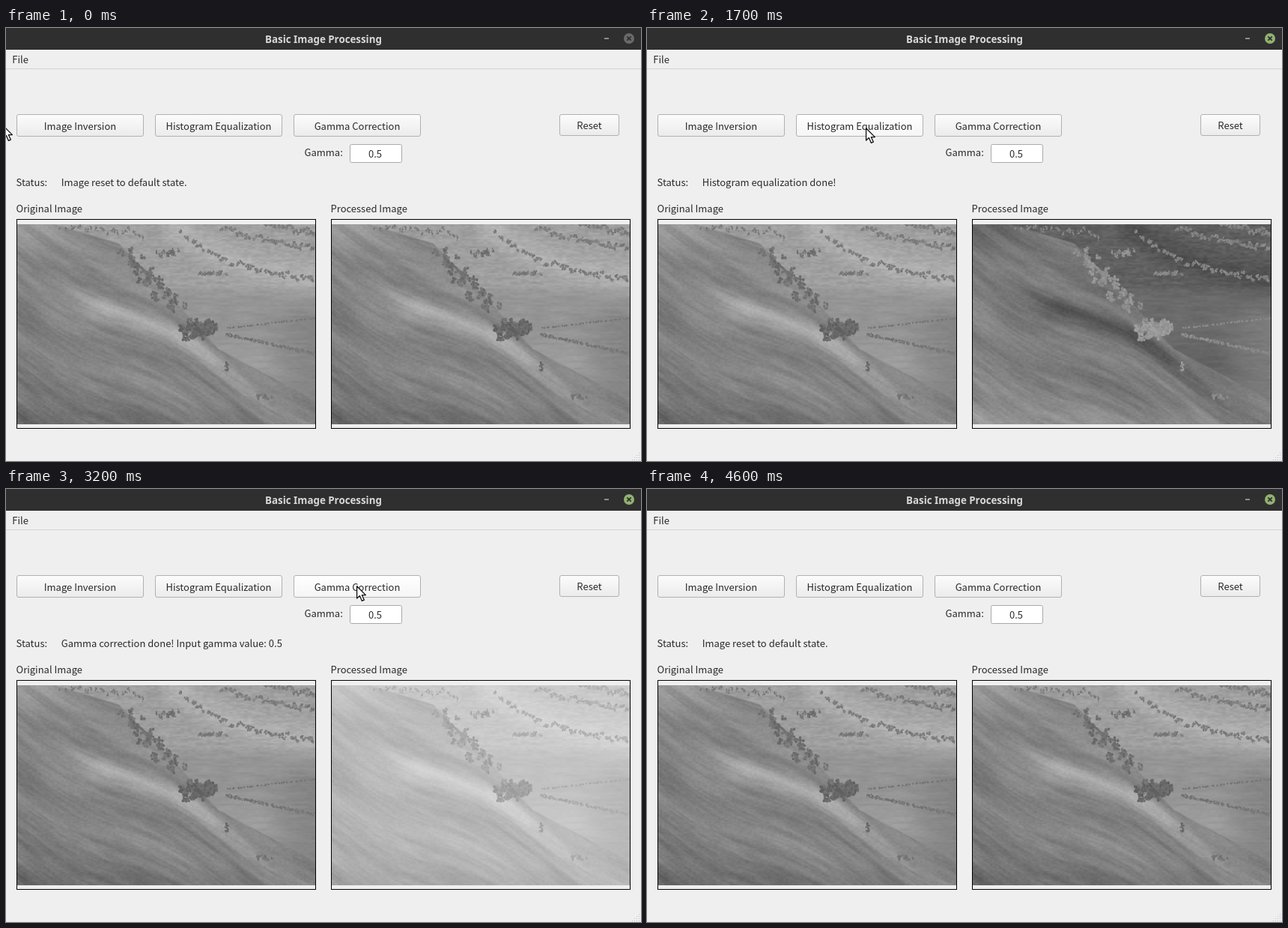
An HTML page with a canvas for the animation above (5400 ms loop, 848x578 px).

```html
<!DOCTYPE html>
<html lang="en">
<head>
<meta charset="utf-8">
<title>Basic Image Processing</title>
<style>
html, body { margin: 0; width: 848px; height: 578px; overflow: hidden; background: #efefef; }
svg, canvas { position: absolute; left: 0; top: 0; }
canvas { top: 262px; }
#before { left: 15px; }
#after { left: 435px; }
text { font: 13px "Noto Sans CJK JP", "Noto Sans CJK SC", "Noto Sans CJK", "Noto Sans", sans-serif; fill: #2a2a2a; white-space: pre; }
.title { font: bold 13.333px "Noto Sans", sans-serif; fill: #d8d8d8; }
.mid { text-anchor: middle; }
.button { fill: url(#face); stroke: #b1b1b1; }
.button.hover { fill: url(#lit); }
.frame { fill: none; stroke: #000; }
</style>
</head>
<body>
<svg width="848" height="578">
  <defs>
    <linearGradient id="face" x2="0" y2="1"><stop stop-color="#fcfcfc"/><stop offset="1" stop-color="#ebebeb"/></linearGradient>
    <linearGradient id="lit" x2="0" y2="1"><stop stop-color="#fff"/><stop offset="1" stop-color="#f5f5f5"/></linearGradient>
  </defs>
  <rect width="848" height="578" fill="#efefef"/>
  <rect width="848" height="29" fill="#2f2f2f"/>
  <text class="title mid" x="424" y="20">Basic Image Processing</text>
  <path d="M799 14h6" stroke="#8d8d8d" stroke-width="2"/>
  <circle id="close" cx="832" cy="14" r="7"/>
  <path d="M829.3 11.3l5.4 5.4m0-5.4l-5.4 5.4" stroke="#2f2f2f" stroke-width="1.8"/>
  <text x="8.3" y="47">File</text>
  <path d="M0 54.5h848" stroke="#d4d4d4"/>
  <g id="buttons"></g>
  <text x="398.5" y="171">Gamma:</text>
  <rect x="459.5" y="155.5" width="69" height="24" rx="2" fill="#fff" stroke="#a9a9a9"/>
  <text class="mid" x="493" y="173">0.5</text>
  <text x="13.5" y="211">Status:</text>
  <text id="status" x="73.7" y="211"></text>
  <text x="13.5" y="246">Original Image</text>
  <text x="433.5" y="246">Processed Image</text>
  <rect class="frame" x="14.5" y="255.5" width="399" height="279"/>
  <rect class="frame" x="434.5" y="255.5" width="399" height="279"/>
  <g id="grip" fill="#bdbdbd"></g>
</svg>
<canvas id="before" width="398" height="267"></canvas>
<canvas id="after" width="398" height="267"></canvas>
<svg width="848" height="578">
  <path id="arrow" d="M.6 .8V17l3.8-3.4 3 6.8 2.9-1.3-3-6.5h5.1z" fill="#fff" stroke="#111" stroke-width="1.3" stroke-linejoin="round"/>
</svg>
<script>
const LOOP = 5400, STEP = 100;
const W = 398, H = 267;
const $ = id => document.getElementById(id);
const svgEl = (tag, attrs, parent) => {
  const el = document.createElementNS("http://www.w3.org/2000/svg", tag);
  for (const k in attrs) el.setAttribute(k, attrs[k]);
  return parent.appendChild(el);
};

// Buttons
const addButton = (label, x, w = 170, h = 30) => {
  const el = svgEl("rect", { class: "button", x: x + .5, y: 115.5, width: w - 1, height: h - 1, rx: 2.5 }, $("buttons"));
  svgEl("text", { class: "mid", x: x + w / 2, y: 106 + h }, $("buttons")).textContent = label;
  return { el, x, w, h };
};
const buttons = ["Image Inversion", "Histogram Equalization", "Gamma Correction"].map((label, i) => addButton(label, 14 + 185 * i));
buttons.push(addButton("Reset", 739, 80, 29));

for (let row = 0; row < 4; row++)
  for (let col = 0; col <= row; col++)
    svgEl("rect", { x: 845 - col * 3, y: 567 + row * 3, width: 1, height: 1 }, $("grip"));

// Noise and curves
const mix = (a, b, p) => a + (b - a) * p;
const smooth = p => p * p * (3 - 2 * p);
const ramp = (a, b, v) => smooth(Math.min(1, Math.max(0, (v - a) / (b - a))));
const bump = (v, width) => Math.exp(-((v / width) ** 2));
const hash = (i, j) => {
  const s = Math.sin(i * 127.1 + j * 311.7) * 43758.5453;
  return s - Math.floor(s);
};
// Smooth value noise from -1 to 1
const noise = (x, y) => {
  const i = Math.floor(x), j = Math.floor(y), p = smooth(x - i), q = smooth(y - j);
  return 2 * mix(mix(hash(i, j), hash(i + 1, j), p), mix(hash(i, j + 1), hash(i + 1, j + 1), p), q) - 1;
};

const ridge = x => 38 + .55 * x + 10 * Math.sin(x / 45);
const belt = (x, k = 0) => 9 + 75 / (k + 1) * (1 - Math.exp((215 + 60 * k - x) / 90)) - 5 * k;
const rim = [[50, 0], [135, 25], [206, 98], [268, 166], [W, 235]];
const edge = x => {
  const i = Math.max(1, rim.findIndex(p => p[0] >= x));
  const [x0, y0] = rim[i - 1], [x1, y1] = rim[i];
  return mix(y0, y1, (x - x0) / (x1 - x0));
};

// Landscape tones
function hill(x, y) {
  const u = y - ridge(x);
  const crest = 24 * bump(u - 3, 13) * ramp(20, 110, x) * ramp(330, 240, x);
  const folds = 6 * Math.sin(u / 13 + 2 * noise(x / 70, u / 40));
  const streaks = 9 * noise(x / 55, u / 8) + 6 * noise(x / 20, u / 3);
  const grass = 5 * noise(x / 3, y / 2);
  return 137 - .09 * Math.max(0, u) + 8 * ramp(100, 20, x + y) - 10 * ramp(225, 265, y) + crest + folds + streaks + grass;
}
function plain(x, y) {
  const far = ramp(100, 75, y);
  const water = 16 * bump(y - belt(x) + 3, 22) * ramp(180, 205, x);
  const foot = 10 * bump(x - 315, 45) * bump(y - 185, 28);
  const shade = 16 * ramp(300, W, x) * ramp(95, 130, y);
  return 149 + 10 * far + water + foot - shade + 5 * noise(x / 25, y / 3) + (3 + 5 * far) * noise(x / 5, y / 2);
}

const g = $("before").getContext("2d", { willReadFrequently: true });
const land = g.createImageData(W, H);
for (let y = 0; y < H; y++)
  for (let x = 0; x < W; x++) {
    const rise = ramp(-1.5, 1.5, y - edge(x));
    const v = mix(plain(x, y), hill(x, y), rise);
    land.data.set([v, v, v, 255], (y * W + x) * 4);
  }
g.putImageData(land, 0, 0);

// Trees
let seed = 11;
const rnd = (a = 0, b = 1) => {
  seed = (seed * 16807) % 2147483647;
  return mix(a, b, seed / 2147483647);
};
const scatter = () => rnd(-1, 1) + rnd(-1, 1);
// Each tree is a crown of small leaves; place(p) gives its middle
function plant(count, place, size, tone, tall = 1) {
  for (let i = 0; i < count; i++) {
    const [x, y] = place((i + rnd()) / count);
    for (let leaf = 0; leaf < 7; leaf++) {
      const v = Math.round(tone + rnd(-13, 13));
      g.fillStyle = `rgb(${v},${v},${v})`;
      g.beginPath();
      g.ellipse(x + scatter() * size * .5, y + scatter() * size * tall * .5, size * .4, size * .45, 0, 0, 7);
      g.fill();
    }
  }
}
const grove = (x, y, w, h) => () => [x + scatter() * w / 2, y + scatter() * h / 2];

for (let k = 0; k < 3; k++)
  plant(42 - 8 * k, p => {
    const x = mix(218 + 55 * k, W, p);
    return [x, belt(x, k) + scatter() * 2.5];
  }, 2.8, 126);
plant(24, p => [mix(55, 170, p), 3 + 10 * p + scatter() * 3], 2, 120, 1.8);
plant(12, grove(262, 66, 22, 3), 2.6, 122);
plant(14, grove(204, 38, 21, 5), 2.2, 110, 2.2);
plant(50, p => {
  const x = mix(145, 216, p);
  return [x + scatter() * 8, edge(x) + 4 + scatter() * 8];
}, 4, 112, 1.3);
plant(60, grove(245, 140, 30, 13), 4.5, 104, 1.2);

// Two hedgerows fan out from the wood
for (const side of [-1, 1])
  plant(34, p => [mix(278, W, p), 143 + 4 * side + 120 * p * (.05 + .165 * side)], 2 + .5 * side, 118);
plant(4, p => [280, 185 + 11 * p], 2.6, 108);
plant(16, grove(330, 230, 14, 4), 1.8, 117);

// Processed versions
const tones = {
  plain: v => v,
  invert: v => 255 - v,
  equalize: v => (v - 98) * 3.6,
  gamma: v => 255 * Math.sqrt(v / 255)
};
const source = g.getImageData(0, 0, W, H);
const pictures = {};
for (const name in tones)
  pictures[name] = new ImageData(source.data.map((v, i) => i % 4 < 3 ? Math.min(255, Math.max(0, tones[name](v))) : v), W, H);

// Each action: glide to a point, click, then show the result
const reset = { x: -4, y: 130, from: 0, to: 0, click: 0, text: "Image reset to default state.", view: "plain" };
const actions = [
  reset,
  { x: 121, y: 132, from: 0, to: 500, click: 600, text: "Image inversion done!", view: "invert" },
  { x: 292, y: 133, from: 1000, to: 1600, click: 1700, lag: 200, text: "Histogram equalization done!", view: "equalize" },
  { x: 427, y: 128, from: 2100, to: 2400, click: 3200, text: "Gamma correction done! Input gamma value: 0.5", view: "gamma" },
  { ...reset, x: 758, y: 133, from: 3100, to: 4100, click: 4200 }
];

function pointerAt(t) {
  let { x, y } = reset;
  for (const a of actions.slice(1)) {
    const p = Math.min(1, Math.max(0, (t - a.from) / (a.to - a.from)));
    const e = 1 - (1 - p) ** 1.25;
    x = mix(x, a.x, e);
    y = mix(y, a.y, e);
  }
  return [Math.round(x), Math.round(y)];
}

const after = $("after").getContext("2d");
let shown;
function render(now) {
  const t = Math.floor((now % LOOP) / STEP) * STEP;
  const [x, y] = pointerAt(t);
  $("arrow").setAttribute("transform", `translate(${x} ${y})`);
  $("arrow").style.display = t < 4600 ? "" : "none";
  $("close").setAttribute("fill", t < 500 ? "#6a6a6a" : "#92b372");
  $("status").textContent = actions.findLast(a => a.click <= t).text;
  for (const b of buttons) {
    const over = t < 4200 && x >= b.x && x < b.x + b.w && y >= 115 && y < 115 + b.h;
    b.el.classList.toggle("hover", over);
  }
  const { view } = actions.findLast(a => a.click + (a.lag || 0) <= t);
  if (view !== shown) after.putImageData(pictures[shown = view], 0, 0);
}

const start = performance.now();
function tick() {
  render(performance.now() - start);
  requestAnimationFrame(tick);
}
tick();
</script>
</body>
</html>
```
